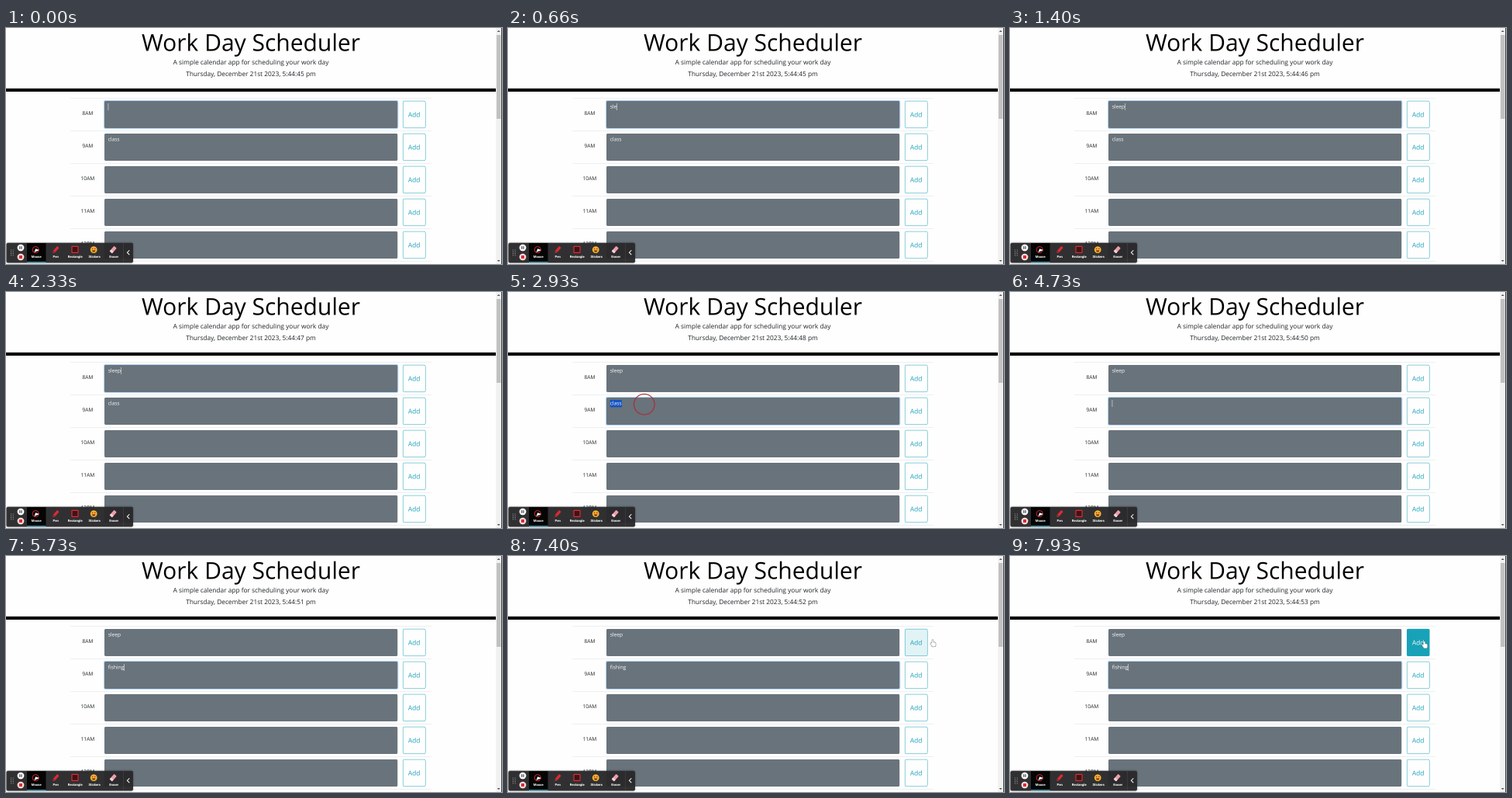
An HTML page with a canvas that plays this animation: 640 px wide and 304 px high, repeating every 8000 ms.

```html
<!DOCTYPE html>
<html lang="en">
<head>
<meta charset="utf-8">
<title>Work Day Scheduler</title>
<style>
  html, body { margin: 0; width: 100%; height: 100%; overflow: hidden; background: #fefefe; }
  canvas { display: block; width: 640px; height: 304px; }
</style>
</head>
<body>
<canvas id="stage" width="1280" height="608"></canvas>
<script>
const ctx = document.getElementById('stage').getContext('2d');
ctx.scale(2, 2); // drawn at double size for soft small text
ctx.textRendering = 'geometricPrecision';

const LOOP = 8000;
const REM = 20 / 3;
const SANS = '"Open Sans", sans-serif';
const INK = '#212529', TEAL = '#17a2b8', RED = '#dc2a32', PAGE = '#fefefe';
const HOURS = ['8AM', '9AM', '10AM', '11AM', '12PM'];
const ROW = 42;

const SLEEP = { word: 'sleep', from: 200, step: 215 };
const FISHING = { word: 'fishing', from: 4800, step: 122 };
const FOCUS_AT = 2660, SELECT_AT = 2800, CLEAR_AT = 4330, HAND_AT = 7330;

const ramp = (t, from, span) => Math.max(0, Math.min(1, (t - from) / span));

function text(str, x, y, size, color, align = 'center', font = SANS, weight = 400) {
  ctx.font = `${weight} ${size}px ${font}`;
  ctx.textAlign = align;
  ctx.fillStyle = color;
  ctx.fillText(str, x, y);
}

function paint(fill, stroke, width = 1) {
  if (fill) { ctx.fillStyle = fill; ctx.fill(); }
  if (stroke) { ctx.strokeStyle = stroke; ctx.lineWidth = width; ctx.stroke(); }
}

function box(x, y, w, h, r, ...style) {
  ctx.beginPath();
  ctx.roundRect(x, y, w, h, r);
  paint(...style);
}

function disc(x, y, r, ...style) {
  ctx.beginPath();
  ctx.arc(x, y, r, 0, 7);
  paint(...style);
}

// Arrow head with its tip at the origin, pointing along the angle
function arrow(x, y, angle, size, ...style) {
  at(x, y, angle, () => {
    ctx.beginPath();
    ctx.moveTo(-size, -size);
    ctx.lineTo(0, 0);
    ctx.lineTo(-size, size);
    paint(...style);
  });
}

function at(x, y, angle, body) {
  ctx.save();
  ctx.translate(x, y);
  ctx.rotate(angle);
  body();
  ctx.restore();
}

function faded(alpha, body) {
  if (alpha <= 0) return;
  ctx.save();
  ctx.globalAlpha = alpha;
  body();
  ctx.restore();
}

const keysDown = ({ word, from, step }, t) =>
  Math.max(0, Math.min(word.length, Math.floor((t - from) / step) + 1));
const typed = (entry, t) => entry.word.slice(0, keysDown(entry, t));

// The blink restarts with every key
function caretOn(t) {
  let last = t < CLEAR_AT ? 0 : CLEAR_AT;
  for (const entry of [SLEEP, FISHING]) {
    const n = keysDown(entry, t);
    if (n) last = Math.max(last, entry.from + (n - 1) * entry.step);
  }
  return Math.floor((t - last) / 500) % 2 === 0;
}

function header(t) {
  const sec = 45 + Math.floor((t + 300) / 1000);
  text('Work Day Scheduler', 316, 29.7, 4.5 * REM, '#000');
  text('A simple calendar app for scheduling your work day', 316, 47.2, 1.25 * REM, INK);
  text(`Thursday, December 21st 2023, 5:44:${sec} pm`, 316, 62, 1.25 * REM, INK);
  box(0, 77.9, 632, 4.1, 0, '#000');
}

function addButton(y, hover) {
  box(512.2, y + .1, 29, 34.7, 1.7, PAGE, TEAL, .5);
  faded(hover, () => box(512, y, 29.4, 35, 1.7, TEAL));
  text('Add', 526.6, y + 20.5, 1.25 * REM, hover > .5 ? '#fff' : TEAL);
}

function row(i, t, value, focus, selected) {
  const y = 94 + i * ROW;
  box(83, y - 3.7, 466, .5, 0, '#dee2e6');
  text(HOURS[i], 105.4, y + 18.1, REM, INK);
  faded(focus, () => box(125.9, y - 1.1, 380.4, 37.2, 2.4, '#b8d8fa'));
  box(127, y, 378.2, 35, 1.7, '#69737b');
  ctx.font = `${REM}px ${SANS}`;
  const w = ctx.measureText(value).width;
  if (selected) box(131.7, y + 3, w + .3, 9.4, 0, '#1452c0');
  text(value, 131.7, y + 9.7, REM, '#fff', 'left');
  if (focus > .5 && !selected && caretOn(t)) box(131.7 + w, y + 3, .5, 9, 0, '#fff');
  const brush = .12 * (1 - Math.abs(t - HAND_AT - 70) / 70);
  addButton(y, i ? 0 : Math.max(brush, ramp(t, 7590, 150)));
}

function scrollbar() {
  box(632.3, 0, 6.7, 304, 0, '#f1f1f1');
  box(633, 9, 5.4, 108, 0, '#c1c1c1');
  arrow(635.7, 3, -Math.PI / 2, 2, '#505050');
  arrow(635.7, 301, Math.PI / 2, 2, '#505050');
  box(639, 0, 1, 304, 0, '#444');
}

const icons = {
  Mouse(x, y) {
    disc(x - 1, y, 4, null, RED, .9);
    arrow(x - 1, y - 1.4, -2, 3.6, '#fff');
  },
  Pen(x, y) {
    at(x, y, -.85, () => {
      box(-3.2, -1.7, 8, 3.4, .5, RED);
      arrow(-5.4, 0, Math.PI, 1.7, RED);
    });
  },
  Rectangle(x, y) {
    box(x - 4.2, y - 4.2, 8, 8, .3, '#3c1517', RED, 1.2);
  },
  Stickers(x, y) {
    disc(x - 1, y, 4.4, '#f5b52e');
    for (const dx of [-2.6, .6]) disc(x + dx, y - 1.2, .9, RED);
    ctx.beginPath();
    ctx.arc(x - 1, y + .8, 2.2, 0, Math.PI);
    paint('#6b3c12');
  },
  Eraser(x, y) {
    at(x - 1, y, -.85, () => {
      box(-4.5, -2.2, 9, 4.4, .8, '#ee9dab');
      box(-4.5, -2.2, 3, 4.4, .8, '#f6d3d8');
    });
  }
};

function toolbar() {
  ctx.save();
  ctx.shadowColor = 'rgba(0,0,0,.4)';
  ctx.shadowBlur = 4;
  box(.5, 276.7, 163.5, 25.8, 2.2, 'rgba(42,42,44,.94)');
  ctx.restore();
  box(151.5, 277, .5, 25, 0, '#49494b');
  for (let i = 0; i < 8; i++) disc(6.6 + (i % 2) * 2.6, 286 + (i >> 1) * 2.3, .55, '#b8b8b8');

  disc(19, 283, 4.4, '#fff');
  for (const x of [17.3, 19.5]) box(x, 281.2, 1.1, 3.6, 0, '#333');
  disc(19, 295, 4.4, '#f7dcdc');
  box(17, 293, 4, 4, .6, RED);

  box(27, 277, 24.5, 24, 0, '#050505');
  box(27, 301, 24.5, 1, 0, '#1fa6c9');
  Object.keys(icons).forEach((name, i) => {
    const x = 39.2 + i * 25;
    icons[name](x, 285.6);
    text(name, x, 296.1, 4.2, '#fff', 'center', 'Roboto, sans-serif', 700);
  });
  arrow(156.4, 289.2, Math.PI, 2.9, null, '#fff', 1);
}

function ring(t) {
  const grow = ramp(t, FOCUS_AT - 60, 160);
  const fade = ramp(t, 2960, 300);
  if (t >= FOCUS_AT) faded(1 - fade, () => disc(175.8, 144.7, 13.3 * grow, null, '#b3272f', 1.1));
}

// Sweeps past the button and swings back onto it
function hand(t) {
  if (t < HAND_AT) return;
  const k = ramp(t, HAND_AT, 430);
  const x = 530 + 5.5 * k + 23 * Math.sin(Math.PI * k ** .7);
  at(x, 112 + 2.5 * k, 0, () => {
    ctx.beginPath();
    ctx.roundRect(-1.6, -4.5, 1.6, 7, .8);
    ctx.roundRect(-2.2, -1.2, 5.2, 5.4, 1.2);
    ctx.ellipse(-2.4, 1.2, .8, 1.8, -.6, 0, 7);
    paint(null, '#666', .9);
    paint('#fff');
  });
}

function draw(t) {
  box(0, 0, 640, 304, 0, PAGE);
  header(t);
  const moved = ramp(t, FOCUS_AT, 150);
  const values = [typed(SLEEP, t), t < CLEAR_AT ? 'class' : typed(FISHING, t)];
  const selected = t >= SELECT_AT && t < CLEAR_AT;
  HOURS.forEach((_, i) =>
    row(i, t, values[i] || '', [1 - moved, moved][i] || 0, i === 1 && selected));
  box(83, 300.3, 466, .5, 0, '#dee2e6');
  scrollbar();
  toolbar();
  ring(t);
  hand(t);
}

const start = performance.now();
function frame() {
  draw((performance.now() - start) % LOOP);
  requestAnimationFrame(frame);
}
frame();
</script>
</body>
</html>
```
